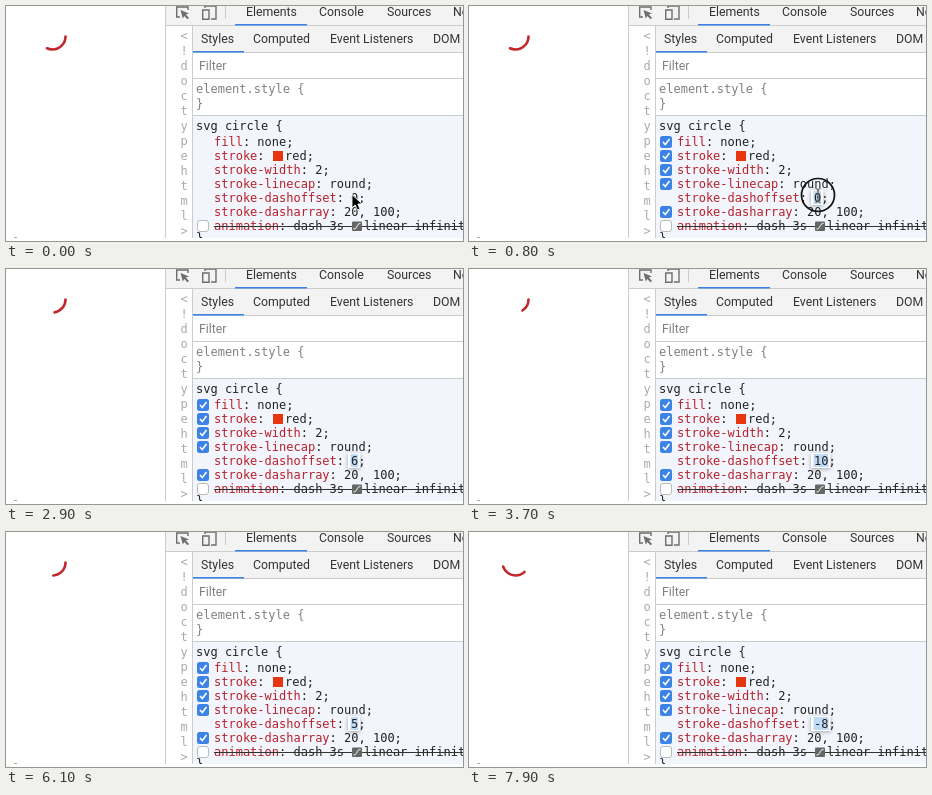
These frames come from a looping animation (457x235 px, 8000 ms). An HTML page:

```html
<!DOCTYPE html>
<html lang="en">
<head>
<meta charset="utf-8">
<title>Dash offset in the style panel</title>
<style>
  html, body { margin: 0; width: 100%; height: 100%; overflow: hidden; background: #fff; }
  svg { display: block; }
  text { white-space: pre; fill: #222; }
  .ui { font: 12.3px Roboto, sans-serif; fill: #333; }
  .code { font: 12px "DejaVu Sans Mono", monospace; }
  .name { fill: #b8202a; }
  .grey { fill: #808080; }
  .pale { fill: #aaa; text-anchor: middle; }
  .icon { fill: none; stroke: #6e6e6e; stroke-width: 1.4; }
  #field { fill: #fff; filter: drop-shadow(0 1px 2px #0005); }
</style>
</head>
<body>
<svg width="457" height="235" viewBox="0 0 457 235">
  <defs><clipPath id="stage"><path d="M0 0H457V232H0Z"/></clipPath></defs>

  <g transform="translate(46.5 30.5) scale(1.3)">
    <circle id="arc" r="10" fill="none" stroke="#c1272d" stroke-width="2"
            stroke-linecap="round" stroke-dasharray="20 100"/>
  </g>
  <path d="M8 231.5h3" stroke="#aaa"/>

  <g clip-path="url(#stage)">
    <path d="M160 0H457V19H160ZM187 20H457V46H187Z" fill="#f3f3f3"/>
    <path d="M187 110H457V232H187Z" fill="#f2f5fc"/>
    <path d="M159.5 0V232M160 19.5H457M186.5 20V232M187 46.5H457M187 72.5H457M187 109.5H457M219.5 0V13"
          stroke="#ccc" fill="none"/>
    <path d="M229 18.8H301M187 45.8H238" stroke="#3b82e8" stroke-width="1.6"/>

    <path class="icon" d="M174 11H170.700V1H182V4"/>
    <path d="M174.500 4L183 7.500L179.800 8.500L183 12L181.500 13.300L178.300 9.900L176.800 12.600Z" fill="#6e6e6e"/>
    <path class="icon" d="M199 2V0H210V13H205M196.700 4H203V13.300H196.700Z"/>

    <g id="labels"></g>
    <g id="rules"></g>
    <rect id="field" x="342" y="184" height="15"/>
    <rect id="selection" x="344.500" y="185" height="13" fill="#bfdaf5"/>
    <text id="value" class="code" x="345" y="196"></text>

    <path id="arrow" d="M346 188.500V202L349.200 199L351.400 204L354 202.900L351.800 198H356Z"
          stroke="#fff" stroke-width=".9"/>
    <g id="click" fill="none" stroke="#111">
      <circle cx="349" cy="189" r="16.500" stroke-width="1.700"/>
    </g>
    <path id="beam" d="M346.500 182.500Q349 182.500 349 185V194Q349 196.500 346.500 196.500M351.500 182.500Q349 182.500 349 185M349 194Q349 196.500 351.500 196.500"
          fill="none" stroke="#555"/>
  </g>
</svg>
<script>
const LOOP = 8000, CHAR = 7.22;
const $ = id => document.getElementById(id);
const add = (id, markup) => $(id).insertAdjacentHTML('beforeend', markup);
const text = (x, y, words, style) => `<text x="${x}" y="${y}" class="${style}">${words}</text>`;

// Panel labels
[[240, 10, 'Elements'], [313, 10, 'Console'], [381, 10, 'Sources'], [447, 10, 'Network'],
 [195, 37, 'Styles'], [247, 37, 'Computed'], [324, 37, 'Event Listeners'], [427, 37, 'DOM']]
  .forEach(([x, y, words]) => add('labels', text(x, y, words, 'ui')));
add('labels', text(193, 64, 'Filter', 'ui grey'));
[...'<!doctype html>'.replace(' ', '')].forEach((c, i) =>
  add('labels', text(178, 34 + 15 * i, c.replace('<', '&lt;'), 'code pale')));

// Style rules
add('rules', text(190, 87, 'element.style {', 'code grey') + text(190, 102, '}', 'code grey')
  + text(190, 124, 'svg circle {', 'code') + text(190, 236, '}', 'code'));
const rules = [['fill', 'none;'], ['stroke', ''], ['stroke-width', '2;'], ['stroke-linecap', 'round;'],
               ['stroke-dashoffset', ''], ['stroke-dasharray', '20, 100;'], ['animation', 'dash 3s']];
rules.forEach(([name, value], i) => {
  const y = 136 + 14 * i;
  add('rules', text(208, y + 4, `<tspan class="name">${name}</tspan>: ${value}`, 'code'));
  add('rules', i < 6
    ? `<g class="check" id="check${i}"><rect x="191" y="${y - 6}" width="12" height="12" rx="2.500" fill="#3d83e6"/>
       <path d="M194 ${y}l2.300 2.600 4.200-5.600" fill="none" stroke="#fff" stroke-width="1.600"/></g>`
    : `<rect x="191.500" y="${y - 5.5}" width="11" height="11" rx="2.500" fill="#fff" stroke="#bbb"/>`);
});
add('rules', `<rect x="267" y="145" width="10" height="10" fill="#e6360f"/>` + text(279, 154, 'red;', 'code')
  + text(358, 224, 'linear infinite;', 'code')
  + `<path d="M208 220.500H457" stroke="#333"/><rect x="346" y="215.500" width="10" height="9.500" rx="1" fill="#666"/>
     <path d="M347.500 223C352 223 350 217.500 354.500 217.500" fill="none" stroke="#fff"/>`);

// Moments of each arrow-key press
const ups = [1600, 2000, 2400, 2600, 2800, 2900, 3100, 3200, 3500, 3700, 3800, 4000, 4100];
const downs = [5100, 5500, 5600, 5700, 5800, 5900, 6000, 6100, 6200, 6300, 6400, 6500, 6600, 6700,
               6900, 7000, 7200, 7400, 7500, 7700, 7900];
const presses = (times, t) => times.filter(at => at <= t).length;
const show = (node, on) => node.style.display = on ? '' : 'none';
const checks = [...document.querySelectorAll('.check')];

function draw(now) {
  const t = now % LOOP;
  const offset = presses(ups, t) - presses(downs, t);
  const hover = t >= 500, editing = t >= 700;
  const width = String(offset).length * CHAR;

  $('arc').setAttribute('stroke-dashoffset', offset);
  $('value').textContent = offset + ';';
  $('field').setAttribute('width', width + 5);
  $('selection').setAttribute('width', width + 0.5);
  checks.forEach((check, i) => show(check, hover && !(editing && i === 4)));
  show($('field'), editing);
  show($('selection'), editing);
  show($('arrow'), !hover);
  show($('beam'), hover && t < 900);
  show($('click'), editing && t < 900);
  requestAnimationFrame(draw);
}
requestAnimationFrame(draw);
</script>
</body>
</html>
```
